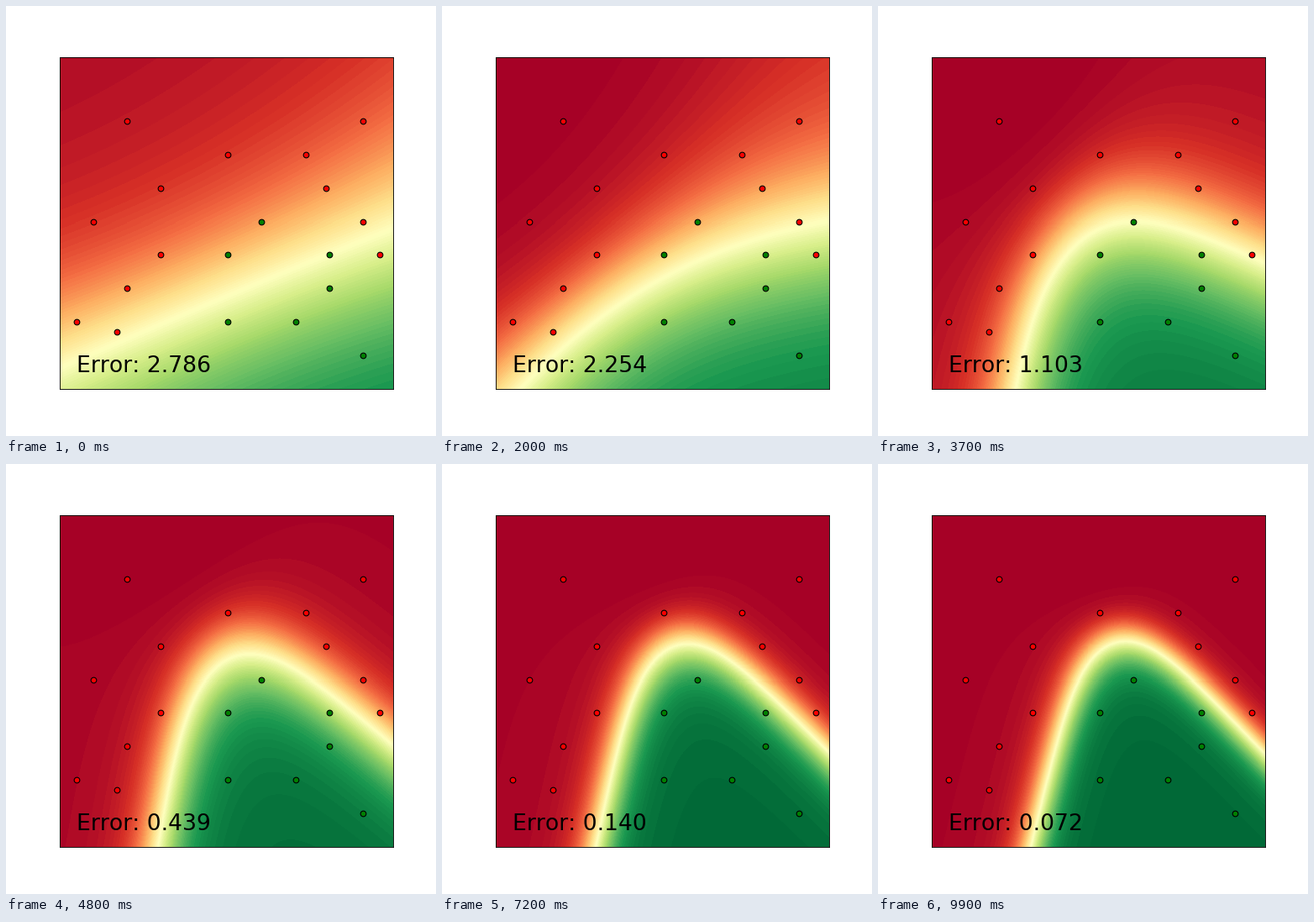
These frames come from a looping animation (512x512 px, 10 s). A matplotlib script:

```python
import numpy as np
import matplotlib.pyplot as plt
from matplotlib.animation import FuncAnimation

FRAMES, INTERVAL = 100, 100
SPAN = 0.99
LEVELS = 100
RATE, MAX_STEPS = 0.03, 50000

RED = [(.2, .8), (.9, .8), (.5, .7), (.73, .7), (.3, .6), (.79, .6), (.1, .5),
       (.9, .5), (.3, .4), (.95, .4), (.2, .3), (.05, .2), (.17, .17)]
GREEN = [(.6, .5), (.5, .4), (.8, .4), (.8, .3), (.5, .2), (.7, .2), (.9, .1)]

# Pace of the training: time in frames -> error reached
PACE = {0: 2.786, 20: 2.254, 37: 1.103, 48: 0.439, 72: 0.140, 99: 0.072}

# Two hidden units and the output unit, each as bias and two weights
START = np.array([[0.4, -2.4, 2.0], [-0.9, -0.2, 3.8], [3.57, -3.5, -4.0]])


def sigmoid(z):
    return 1 / (1 + np.exp(-z))


def with_bias(rows):
    return np.vstack([np.ones(rows.shape[1]), rows])


def forward(w, inputs):
    hidden = with_bias(sigmoid(w[:2] @ inputs))
    return hidden, sigmoid(w[2] @ hidden)


def train(w, goal):
    """Gradient descent on the squared error; returns all weights and errors."""
    inputs = with_bias(np.array(RED + GREEN).T)
    target = np.repeat([0.0, 1.0], [len(RED), len(GREEN)])
    weights, errors = [], []
    while len(weights) < MAX_STEPS:
        hidden, out = forward(w, inputs)
        miss = out - target
        weights.append(w)
        errors.append(miss @ miss)
        if errors[-1] <= goal:
            break
        d_out = miss * out * (1 - out)
        h = hidden[1:]
        d_hidden = w[2, 1:, None] * d_out * h * (1 - h)
        w = w - RATE * np.vstack([d_hidden @ inputs.T, hidden @ d_out])
    return np.array(weights), np.array(errors)


weights, errors = train(START, min(PACE.values()))
falling = np.minimum.accumulate(errors)
marks = np.interp(-np.array(list(PACE.values())), -falling,
                  np.arange(len(errors)))
steps = np.interp(np.arange(FRAMES), list(PACE), marks)


def blend(series, step):
    k = min(int(step), len(series) - 2)
    return series[k] + (step - k) * (series[k + 1] - series[k])


def centers(n):
    return (np.arange(n) + 0.5) / n * SPAN


X, Y = np.meshgrid(centers(397), centers(394))
GRID = with_bias(np.array([X.ravel(), Y.ravel()]))


def field(w):
    out = forward(w, GRID)[1].reshape(X.shape)
    return (np.floor(out * LEVELS) + 0.5) / LEVELS


plt.rcParams["text.kerning_factor"] = 6
fig = plt.figure(figsize=(6.4, 6.4), dpi=80, facecolor="white")
ax = fig.add_axes([0.125, 0.11, 0.775, 0.77])
image = ax.imshow(field(START), cmap="RdYlGn", vmin=0, vmax=1,
                  origin="lower", extent=(0, SPAN, 0, SPAN),
                  interpolation="nearest", aspect="auto")
for points, color in ((RED, "red"), (GREEN, "green")):
    ax.plot(*zip(*points), "o", ms=6, mfc=color, mec="black", mew=1)
label = ax.text(0.05, 0.05, "", fontsize=24, family="DejaVu Sans")
ax.set(xlim=(0, SPAN), ylim=(0, SPAN), xticks=[], yticks=[])


def update(i):
    image.set_data(field(blend(weights, steps[i])))
    label.set_text(f"Error: {blend(errors, steps[i]):.3f}")
    return image, label


anim = FuncAnimation(fig, update, frames=FRAMES, interval=INTERVAL,
                     repeat=True, repeat_delay=0)
plt.show()
```
